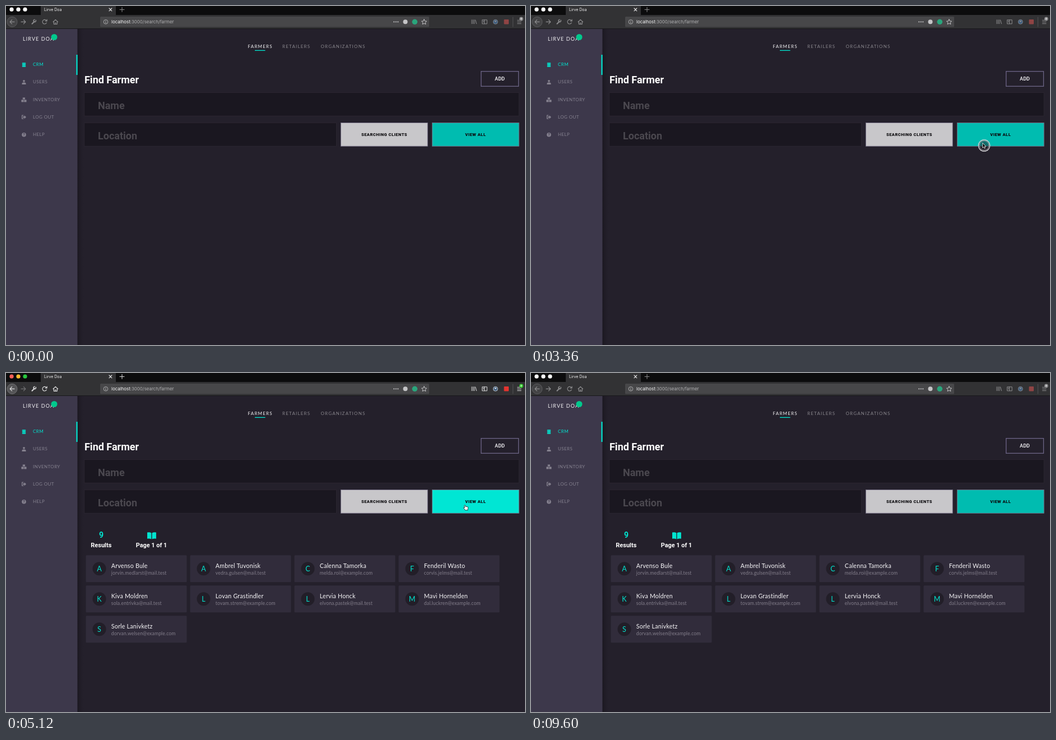
Animation, 926 px wide and 605 px high, one loop 9.76 s. Source, as an HTML page:

```html
<!DOCTYPE html>
<html lang="en">
<head>
<meta charset="utf-8">
<title>Find Farmer</title>
<style>
  html, body { margin: 0; width: 100%; height: 100%; overflow: hidden; background: #24202b; }
  svg { display: block; width: 926px; height: 605px; }
  text { white-space: pre; }
  .ui { font-family: Inter, sans-serif; }
  .bold { font-family: Roboto, sans-serif; font-weight: 700; }
  .heavy { font-family: Roboto, sans-serif; font-weight: 800; }
  .lato { font-family: Lato, sans-serif; }
  .line { fill: none; stroke-linecap: round; stroke-linejoin: round; }
  #chrome { --icon: #8d8d8f; --dim: #8d8d8f; --back: #434345; --rim: #656567; --badge: #8b8b8d; --red: #8f4444;
            --l0: #fff; --l1: #fff; --l2: #fff; }
  #chrome.active { --icon: #dededf; --dim: #737375; --back: #555557; --rim: #7c7c7e; --badge: #32d02c; --red: #e3342f;
                   --l0: #ff5f57; --l1: #febc2e; --l2: #28c840; }
</style>
</head>
<body>
<svg id="stage" viewBox="0 0 926 605" xmlns="http://www.w3.org/2000/svg"></svg>
<script>
const TEAL = '#00e5d0';
const GREY = '#85818f';

const rect = (x, y, w, h, fill, extra = '') =>
  `<rect x="${x}" y="${y}" width="${w}" height="${h}" fill="${fill}" ${extra}/>`;
const circle = (x, y, r, fill, extra = '') =>
  `<circle cx="${x}" cy="${y}" r="${r}" fill="${fill}" ${extra}/>`;
const line = (d, stroke, width = 1, extra = '') =>
  `<path class="line" d="${d}" stroke="${stroke}" stroke-width="${width}" ${extra}/>`;
const shape = (d, fill, extra = '') => `<path d="${d}" fill="${fill}" ${extra}/>`;
const text = (x, y, str, size, fill, cls, spacing = 0, anchor = 'start') =>
  `<text x="${x}" y="${y}" class="${cls}" font-size="${size}" fill="${fill}" letter-spacing="${spacing}" text-anchor="${anchor}">${str}</text>`;

function browser() {
  const icon = 'var(--icon)', field = '#c4c4c6';
  return `<g id="chrome">` +
    rect(0, 0, 926, 16, '#0c0c0d') + rect(62, 0, 134, 16, '#323234') +
    rect(0, 16, 926, 25, '#323234') + rect(0, 40, 926, 1, '#18181a') +
    [10, 22, 34].map((x, i) => circle(x, 6.2, 3.6, `var(--l${i})`)).join('') +
    text(68, 9.3, 'Lirve Doa', 7, '#f4f4f5', 'ui') +
    line('M184 4l4.8 4.8M188.8 4l-4.8 4.8', '#e8e8e9', 1.1) +
    line('M203 6.4h8M207 2.4v8', icon) +
    circle(11, 28.3, 9, 'var(--back)', 'stroke="var(--rim)" stroke-width=".8"') +
    line('M15 28.3H7.2m3.4-3.6l-3.5 3.6 3.5 3.6', icon, 1.2) +
    line('M27 28.3h7.8m-3.4-3.6l3.5 3.6-3.5 3.6', 'var(--dim)', 1.2) +
    line('M46.5 31.8l4.2-4.2', icon, 2) +
    line('M53.2 25.3a2.2 2.2 0 1 1-2.2-1.1', icon, 1.5) +
    line('M72.2 30a3.8 3.8 0 1 1-.1-3.8m1-2.2v2.8h-2.8', icon, 1.2) +
    line('M84 28.4l4.3-4 4.3 4M85.4 28v4.3h5.8V28M88.3 32v-2.4', icon, 1.2) +
    rect(168, 19, 587, 18.5, '#474749', 'rx="1.5"') +
    circle(178, 28.3, 3.8, 'none', `stroke="${field}" stroke-width=".8"`) +
    line('M178 28v2.2M178 26.3v.1', field, .9) +
    text(188, 31.2, 'localhost<tspan fill="#b1b1b3">:3000/search/farmer</tspan>', 7.9, '#f9f9fa', 'ui') +
    [692.3, 695.8, 699.3].map(x => circle(x, 28.3, 1.1, field)).join('') +
    circle(712.5, 28.3, 4, field) + circle(729.3, 28.3, 4.8, '#2aa57c') +
    line('M746 23.8l1.4 3 3.2.4-2.4 2.2.7 3.2-2.9-1.6-2.9 1.6.7-3.2-2.4-2.2 3.2-.4z', field) +
    line('M831 24.7v7M833.4 24.7v7M835.8 24.7v7M837.5 25l2 6.7', icon) +
    line('M850 24.8h8.2v7H850zM853.7 24.8v7M851.4 26.8h1M851.4 28.6h1', icon) +
    circle(873.3, 28.3, 4, '#3f5f80', `stroke="${icon}" stroke-width=".8"`) + circle(873.3, 27.3, 1.4, icon) +
    rect(888.5, 24, 8.5, 8.5, 'var(--red)', 'rx="1"') +
    line('M904.5 20v17', '#5a5a5c', .8) +
    line('M912.5 25.5h6.5M912.5 28.5h6.5M912.5 31.5h6.5', icon) +
    circle(919.3, 23, 3.4, 'var(--badge)') + line('M919.3 24.8v-3.3m-1.3 1.2l1.3-1.3 1.3 1.3', '#eee', .8) +
    `</g>`;
}

function sidebar() {
  const items = ['CRM', 'USERS', 'INVENTORY', 'LOG OUT', 'HELP'];
  const icons = [
    [0, 1, 2].map(i => rect(28.7, 101.2 + i * 2.7, 6.6, 2.2, TEAL, 'rx="1"')).join(''),
    circle(32, 133.8, 1.9, GREY) + shape('M28.5 140v-1.4q0-2.2 2.2-2.2h2.6q2.2 0 2.2 2.2V140z', GREY),
    rect(29.8, 163.4, 4.2, 3.3, GREY) + rect(27.4, 167.4, 4.2, 4, GREY) + rect(32.3, 167.4, 4.2, 4, GREY),
    line('M30.8 195.2h-2.2v6h2.2', GREY, 1.3) + shape('M30.3 197h2.4v-2l3.3 3.2-3.3 3.2v-2h-2.4z', GREY),
    circle(32, 229.7, 3.8, GREY) + text(32, 232, '?', 6.5, '#3d384b', 'bold', 0, 'middle')
  ];
  return rect(0, 41, 127.6, 564, '#3d384b') + rect(127.6, 41, 12, 564, 'url(#shade)') +
    text(30, 61.8, 'LIRVE DOA', 9, '#f0eff2', 'lato', 1.1) + circle(86, 55.5, 5.5, '#00c98d') +
    rect(125.4, 87, 2.2, 36, TEAL) + icons.join('') +
    items.map((s, i) => text(48, 107.2 + i * 31.2, s, 8, i ? GREY : TEAL, 'lato', .4)).join('');
}

function searchForm() {
  const input = 'stroke="#2d2934" stroke-width=".8"';
  const border = 'stroke="#787289" stroke-width=".9"';
  return text(431.5, 74.8, 'FARMERS', 8, '#f3f2f4', 'lato', 1.2) +
    text(493, 75.2, 'RETAILERS', 8, '#88858c', 'lato', 1.2) +
    text(561.5, 75.2, 'ORGANIZATIONS', 8, '#88858c', 'lato', 1.2) +
    rect(444, 78.7, 18.5, 1.3, TEAL) +
    text(140, 138, 'Find Farmer', 18, '#fff', 'bold') +
    rect(847.7, 116.7, 66.8, 26.6, 'none', 'stroke="#6d6587" stroke-width="1.3"') +
    text(881, 133, 'ADD', 9, '#dedde1', 'bold', 0, 'middle') +
    rect(139.8, 154.4, 775.3, 41.8, '#1a1720', input) + text(164, 183.5, 'Name', 18, '#4b484f', 'bold') +
    rect(139.8, 208.4, 449.6, 41.8, '#1a1720', input) + text(164, 237.5, 'Location', 18, '#4b484f', 'bold') +
    rect(597.4, 208.5, 154.8, 41.7, '#c8c7ca', border) +
    text(675, 232, 'SEARCHING CLIENTS', 7.5, '#0b0a0d', 'heavy', .5, 'middle') +
    rect(760.4, 208.5, 154.8, 41.7, '#00bcb0', `id="viewAll" ${border}`) +
    text(837.7, 232, 'VIEW ALL', 7.5, '#0b0a0d', 'heavy', .5, 'middle');
}

const people = [
  ['Arvenso Bule', 'jorvin.medlarst@mail.test'],
  ['Ambrel Tuvonisk', 'vedra.gulsen@mail.test'],
  ['Calenna Tamorka', 'melda.roi@example.com'],
  ['Fenderil Wasto', 'corvis.jelms@mail.test'],
  ['Kiva Moldren', 'sola.entrivka@mail.test'],
  ['Lovan Grastindler', 'tovam.strem@example.com'],
  ['Lervia Honck', 'elvona.pastek@mail.test'],
  ['Mavi Hornelden', 'dal.luckren@example.com'],
  ['Sorle Lanivketz', 'dorvan.welsen@example.com']
];

function card([name, mail], i) {
  const x = 142.5 + (i % 4) * 186, y = 325.3 + Math.floor(i / 4) * 54;
  return rect(x, y, 180, 48, '#312c3b', 'rx="1.5"') + circle(x + 24, y + 24, 12, '#221e28') +
    text(x + 24, y + 28.3, name[0], 12.5, TEAL, 'lato', 0, 'middle') +
    text(x + 45.3, y + 22.2, name, 10.7, '#f7f6f8', 'lato', .2) +
    text(x + 45.3, y + 34.2, mail, 8.6, '#837e8b', 'lato', .15);
}

function results() {
  return `<g id="results">` +
    text(170, 293.8, people.length, 14, TEAL, 'bold', 0, 'middle') +
    text(169.8, 310.7, 'Results', 11, '#fff', 'bold', 0, 'middle') +
    shape('M252 284.6q4.5-.9 7.3.8v11.2q-3-1.5-7.3-.9zM267.9 284.6q-4.5-.9-7.3.8v11.2q3-1.5 7.3-.9z', TEAL) +
    text(259.5, 310.7, 'Page 1 of 1', 10.9, '#fff', 'bold', 0, 'middle') +
    people.map(card).join('') + `</g>`;
}

const pointer = `<g id="cursor">
  <g id="ring">${circle(0, 0, 10.2, '#1f1c25', 'fill-opacity=".5" stroke="#e4e3e6" stroke-width="1.2"')}
    ${circle(0, 0, 8.3, 'none', 'stroke="#bbb9bf" stroke-width=".8"')}</g>
  ${shape('M-2.8-4.8v9l2-1.8 1.3 2.9 1.5-.7-1.3-2.8h2.6z', '#111', 'id="arrow" stroke="#f4f4f4" stroke-width=".8"')}
  ${shape('M-2.6-3.6q.8-1.3 1.7 0l.6 2q2.400-.6 4.200.8.700 2-.3 4v1.600h-4.600q-1-2-3.200-4 .4-1.200 2.300-.3z', '#fff', 'id="hand" stroke="#15131a" stroke-width=".8"')}
</g>`;

document.getElementById('stage').innerHTML =
  `<defs><linearGradient id="shade"><stop stop-color="#17141c" stop-opacity=".75"/>
   <stop offset="1" stop-color="#24202b" stop-opacity="0"/></linearGradient></defs>` +
  rect(0, 0, 926, 605, '#24202b') + sidebar() + searchForm() + results() + browser() + pointer;

const LOOP = 9760, TICK = 160;
const linear = u => u;
const easeOut = u => 1 - (1 - u) ** 3;
const smooth = u => u * u * (3 - 2 * u);

const path = [ // time, x, y, easing towards the next point
  [800, 396, 598, linear],
  [1440, 503, 489, linear],
  [1760, 556, 449, linear],
  [2560, 704.5, 330.5, linear],
  [2880, 757, 288.3, easeOut],
  [4000, 820.3, 240, linear],
  [5600, 820.3, 240, smooth],
  [6720, 524.5, 489.8, linear],
  [6880, 523.5, 490.6, linear],
  [8800, 523.5, 490.6, linear],
  [8960, 521, 516, linear]
];

function cursorAt(t) {
  const next = path.findIndex(p => p[0] > t);
  if (next < 1) return path[path.length - 1].slice(1, 3);
  const [t0, x0, y0, ease] = path[next - 1], [t1, x1, y1] = path[next];
  const k = ease((t - t0) / (t1 - t0));
  return [x0 + (x1 - x0) * k, y0 + (y1 - y0) * k];
}

const $ = id => document.getElementById(id);
const show = (id, on) => $(id).setAttribute('visibility', on ? 'visible' : 'hidden');
const ramp = (t, from, to) => Math.min(1, Math.max(0, (t - from) / (to - from)));

function draw(ms) {
  const t = Math.floor((ms % LOOP) / TICK) * TICK;
  const seen = t >= 800 && t < 9120;
  const active = t >= 4000 && t < 9600;
  const [x, y] = cursorAt(t);
  const hover = seen && active && x > 760 && y < 250;
  $('chrome').setAttribute('class', active ? 'active' : '');
  $('cursor').setAttribute('transform', `translate(${x} ${y})`);
  $('viewAll').setAttribute('fill', hover ? '#00e6d4' : '#00bcb0');
  $('results').setAttribute('opacity', ramp(t, 4320, 5120));
  show('ring', seen && t < 4320);
  show('arrow', seen && !hover);
  show('hand', hover);
}

const start = performance.now();
function frame() {
  draw(performance.now() - start);
  requestAnimationFrame(frame);
}
frame();
</script>
</body>
</html>
```
